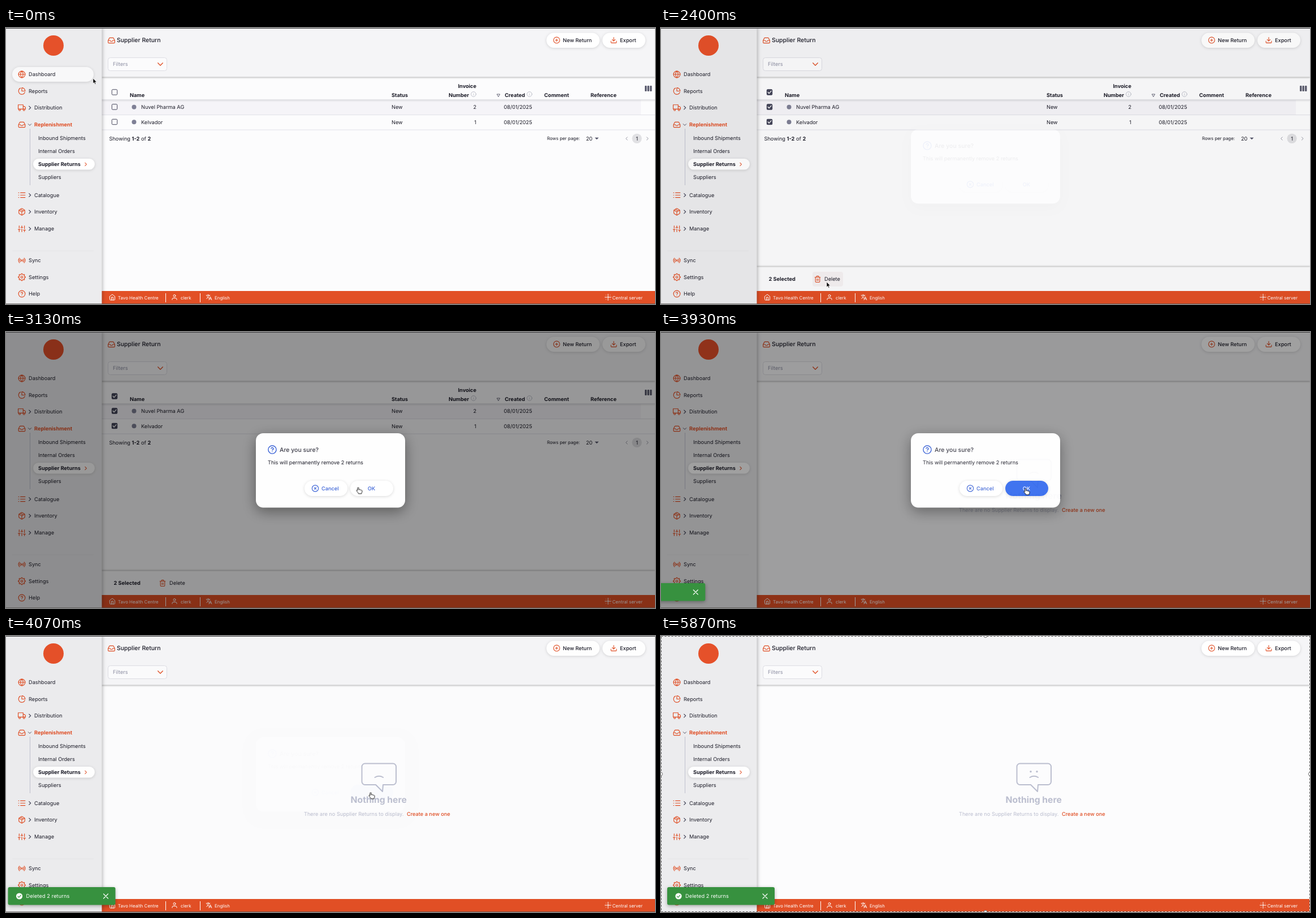
These frames come from a looping animation (1148x488 px, 6 s). An HTML page:

```html
<!DOCTYPE html>
<html lang="en">
<head>
<meta charset="utf-8">
<title>Supplier returns</title>
<style>
  html, body { margin: 0; width: 100%; height: 100%; overflow: hidden; background: #fcfcfd; }
  svg { display: block; width: 100%; height: 100%; }
  text { font-family: Inter, "Liberation Sans", sans-serif; fill: #1c1c28; text-rendering: geometricPrecision; white-space: pre; }
  .b { font-weight: 700; }
  .m { font-weight: 500; }
  .end { text-anchor: end; }
  .mid { text-anchor: middle; }
  .orange { fill: #e04e24; }
  .blue { fill: #3a62d6; }
  .white { fill: #fff; }
  .pale { fill: #bbbecf; }
  .hint { fill: #8d8fa3; }
  .soft { fill: #3c3c48; }
  .line { fill: none; stroke-linecap: round; stroke-linejoin: round; }
  .pill { fill: #fff; filter: drop-shadow(0 1.5px 2.5px rgba(0, 0, 0, .14)); }
  .toast { letter-spacing: .0107em; }
</style>
</head>
<body>
<svg id="stage" viewBox="0 0 1148 488" preserveAspectRatio="none"></svg>
<script>
const LOOP = 6000, FRAME = 200 / 3;
const ORANGE = '#e04e24', BLUE = '#3a62d6', INK = '#45465a', PALE = '#bbbecf';

const ring = '<circle cx="12" cy="12" r="10"/>';
const path = d => `<path d="${d}"/>`;

// Eight-toothed cog on a 24 unit grid
const cog = 'M' + Array.from({ length: 32 }, (_, i) => {
  const r = i % 4 < 2 ? 10.8 : 8.2, a = (i - .5) * Math.PI / 16;
  return (12 + r * Math.cos(a)).toFixed(1) + ' ' + (12 + r * Math.sin(a)).toFixed(1);
}).join('L') + 'z';

const icons = {
  globe: ring + path('M2 12h20M12 2a15.3 15.3 0 0 1 4 10 15.3 15.3 0 0 1-4 10 15.3 15.3 0 0 1-4-10 15.3 15.3 0 0 1 4-10z'),
  pie: path('M21.2 15.9A10 10 0 1 1 8 2.8M22 12A10 10 0 0 0 12 2v10z'),
  truck: path('M1 3h15v13H1zM16 8h4l3 3v5h-7z') + '<circle cx="5.5" cy="18.5" r="2.5"/><circle cx="18.5" cy="18.5" r="2.5"/>',
  inbox: path('M22 12h-6l-2 3h-4l-2-3H2M5.5 5.1L2 12v6a2 2 0 0 0 2 2h16a2 2 0 0 0 2-2v-6l-3.5-6.9A2 2 0 0 0 16.8 4H7.2a2 2 0 0 0-1.7 1.1z'),
  list: path('M8 5h14M8 12h14M8 19h14M2 5h1M2 12h1M2 19h1'),
  box: path('M21 16V8a2 2 0 0 0-1-1.7l-7-4a2 2 0 0 0-2 0l-7 4A2 2 0 0 0 3 8v8a2 2 0 0 0 1 1.7l7 4a2 2 0 0 0 2 0l7-4a2 2 0 0 0 1-1.7zM3.3 7L12 12l8.7-5M12 22V12M7.5 4.2l9 5.2'),
  sliders: path('M4 21v-7M4 10V3M12 21v-9M12 8V3M20 21v-5M20 12V3M1 14h6M9 8h6M17 16h6'),
  radio: '<circle cx="12" cy="12" r="2"/>' + path('M16.2 7.8a6 6 0 0 1 0 8.5M7.8 16.2a6 6 0 0 1 0-8.5M19.1 4.9a10 10 0 0 1 0 14.2M4.9 19.1a10 10 0 0 1 0-14.2'),
  cog: path(cog) + '<circle cx="12" cy="12" r="3"/>',
  help: ring + path('M9.1 9a3 3 0 0 1 5.8 1c0 2-3 3-3 3M12 17h.01'),
  plus: ring + path('M12 8v8M8 12h8'),
  cancel: ring + path('M15 9l-6 6M9 9l6 6'),
  info: ring + path('M12 16v-4M12 8h.01'),
  download: path('M21 15v4a2 2 0 0 1-2 2H5a2 2 0 0 1-2-2v-4M7 10l5 5 5-5M12 15V3'),
  trash: path('M3 6h18M19 6v14a2 2 0 0 1-2 2H7a2 2 0 0 1-2-2V6M8 6V4a2 2 0 0 1 2-2h4a2 2 0 0 1 2 2v2M10 11v6M14 11v6'),
  home: path('M3 9l9-7 9 7v11a2 2 0 0 1-2 2H5a2 2 0 0 1-2-2zM9 22V12h6v10'),
  user: path('M20 21v-2a4 4 0 0 0-4-4H8a4 4 0 0 0-4 4v2') + '<circle cx="12" cy="7" r="4"/>',
  language: path('M2 5h14M9 2v3M13 5c-1 5-5 9-10 12M5 8c2 4 4 6 7 8M12 22l5-12 5 12M14 18h6'),
  hub: '<circle cx="12" cy="12" r="2.5"/>' + path('M12 1v6M12 17v6M1 12h6M17 12h6M4.5 4.5h.01M19.5 4.5h.01M4.5 19.5h.01M19.5 19.5h.01'),
  right: path('M9 5l7 7-7 7'),
  left: path('M15 5l-7 7 7 7'),
  down: path('M4 8l8 8 8-8'),
  close: path('M4 4l16 16M20 4L4 20')
};

const icon = (name, x, y, size = 14, color = ORANGE, weight = 2) =>
  `<g class="line" stroke="${color}" stroke-width="${weight}" transform="translate(${x - size / 2} ${y - size / 2}) scale(${size / 24})">${icons[name]}</g>`;
const text = (x, y, s, cls = '', size = 9.2) =>
  `<text x="${x}" y="${y + size * .36}" class="${cls}" font-size="${size}">${s}</text>`;
const rect = (x, y, w, h, attrs) => `<rect x="${x}" y="${y}" width="${w}" height="${h}" ${attrs}/>`;
const pill = (x, y, w, h) => rect(x, y, w, h, `rx="${h / 2}" class="pill"`);
const group = (id, body, attrs = '') => `<g id="${id}" ${attrs}>${body}</g>`;

const tick = (x, y) => `<path class="line" d="M${x - 2.8} ${y}l2 2.2 3.8-4.4" stroke="#fff" stroke-width="1.3"/>`;
const filled = (x, y) => rect(x - 5, y - 5, 10, 10, `rx="1.5" fill="${INK}"`);
const checkbox = (id, y) =>
  rect(187.3, y - 4.7, 9.4, 9.4, `rx="1.5" fill="none" stroke="${INK}" stroke-width="1"`) +
  group(id, filled(192, y) + tick(192, y));

const navItem = ([name, label, y, arrow]) =>
  icon(name, 28, y) +
  (arrow ? icon(arrow, 42, y, arrow === 'down' ? 8 : 10, INK, 2.8) : '') +
  text(arrow ? 50 : 40, y, label, arrow === 'down' ? 'b orange' : '');

const sidebar =
  rect(0, 0, 169.5, 488, 'fill="#ececee" style="filter:drop-shadow(1px 0 3px rgba(0,0,0,.3))"') +
  '<circle cx="84" cy="31" r="18" fill="#e5512a"/>' +
  group('navHover', rect(11, 69, 144, 26, 'rx="13" class="pill" style="fill:#f8f8f9"')) +
  [['globe', 'Dashboard', 82], ['pie', 'Reports', 111.5],
   ['truck', 'Distribution', 141, 'right'], ['inbox', 'Replenishment', 171, 'down'],
   ['list', 'Catalogue', 295.5, 'right'], ['box', 'Inventory', 325, 'right'],
   ['sliders', 'Manage', 355, 'right'], ['radio', 'Sync', 411],
   ['cog', 'Settings', 440.5], ['help', 'Help', 470]].map(navItem).join('') +
  rect(42, 178, 1, 100, 'fill="#bfc1ce"') + rect(11, 393.5, 144, 1, 'fill="#e3e3e6"') +
  pill(48, 231, 109, 19.5) +
  text(57, 195, 'Inbound Shipments') + text(57, 218, 'Internal Orders') +
  text(57, 241, 'Supplier Returns', 'b') + text(57, 264, 'Suppliers') +
  icon('right', 141, 241, 9, ORANGE, 2.8);

const toolbar =
  rect(169, 0, 979, 86.5, 'fill="#f5f5f7" style="filter:drop-shadow(0 1px 1.5px rgba(0,0,0,.32))"') +
  icon('inbox', 186.5, 22) + text(196, 21.5, 'Supplier Return', 'm', 10.5) +
  pill(956, 8.5, 94, 26.5) + icon('plus', 974, 21.5, 13) + text(985, 22, 'New Return', 'm') +
  pill(1055, 8.5, 76, 26.5) + icon('download', 1075, 21.5, 13) + text(1086, 22, 'Export', 'm') +
  rect(180.5, 52.5, 104, 23, 'rx="4" fill="#fbfbfc" stroke="#dddde3"') +
  text(189, 64, 'Filters', 'hint') + icon('down', 273, 64, 13, ORANGE, 2.4);

const tableRow = (n, y, name, number) =>
  group('hover' + n, rect(169, y - 13, 954, 26.5, 'fill="#e5e9f8"')) +
  rect(169, y + 13.3, 979, 1, 'fill="#e2e2e8"') +
  checkbox('check' + n, y - .3) + `<circle cx="226.5" cy="${y}" r="4" fill="#7f8096"/>` +
  text(239, y, name) + text(682, y, 'New') + text(832, y, number, 'end') + text(880.5, y, '08/01/2025');

const table =
  rect(169, 127, 954, 26.5, 'fill="#f5f4f8"') +
  tableRow(1, 139.8, 'Nuvel Pharma AG', '2') + tableRow(2, 166.3, 'Kelvador', '1') +
  rect(169, 126.5, 979, 1, 'fill="#d9d9df" style="filter:drop-shadow(0 1px 1px rgba(0,0,0,.2))"') +
  checkbox('checkAll', 113.5) +
  group('checkSome', filled(192, 113.5) + rect(189, 112.8, 6, 1.4, 'fill="#fff"')) +
  text(219, 119, 'Name', 'b') + text(682, 119, 'Status', 'b') +
  text(832, 103, 'Invoice', 'b end') + text(819, 119, 'Number', 'b end') +
  icon('info', 827, 117, 10.5, '#a3a5b5', 1.5) +
  '<path d="M868.3 117h5.4l-2.7 4.6z" fill="none" stroke="#55566a" stroke-width=".9"/>' +
  text(918, 119, 'Created', 'b end') + icon('info', 926, 117, 10.5, '#a3a5b5', 1.5) +
  text(952, 119, 'Comment', 'b') + text(1034, 119, 'Reference', 'b') +
  [1130, 1134.5, 1139].map(x => rect(x, 102, 3.4, 10, 'rx="1" fill="#5d5e70"')).join('') +
  text(182.5, 195.5, 'Showing <tspan class="b">1-2</tspan> of <tspan class="b">2</tspan>') +
  text(957, 195.5, 'Rows per page:', '', 7.9) + text(1026, 195.5, '20') +
  '<path d="M1041.5 193.7h7l-3.5 3.6z" fill="#55566a"/>' +
  icon('left', 1098, 195.5, 9, '#8a8b98', 2.4) + icon('right', 1134.5, 195.5, 9, '#8a8b98', 2.4) +
  '<circle cx="1116" cy="195.3" r="8.6" fill="#e1e1e4"/>' + text(1116, 195.5, '1', 'mid');

const actionBar =
  rect(169, 422.5, 979, 42.5, 'fill="#fbfbfc" style="filter:drop-shadow(0 -1px 1.5px rgba(0,0,0,.28))"') +
  group('one', text(190.5, 444, '1 Selected', 'b')) + group('two', text(190.5, 444, '2 Selected', 'b')) +
  group('deleteHover', rect(268, 431, 54, 26, 'rx="4" fill="#f5f1f2"')) +
  group('delete', icon('trash', 276, 444, 13) + text(288, 444, 'Delete'));

const empty =
  `<path class="line" stroke="${PALE}" stroke-width="2" d="M635 225.5h49.500a5.500 5.500 0 0 1 5.500 5.500v26.500a5.500 5.500 0 0 1-5.500 5.500h-17.500l-1 12-12-12h-19a5.500 5.500 0 0 1-5.500-5.500v-26.500a5.500 5.500 0 0 1 5.500-5.500z"/>` +
  `<path class="line" stroke="${PALE}" stroke-width="2" d="M652.500 250q7.300-4.600 14.600 0"/>` +
  group('eyes', '<circle cx="654" cy="239.800" r="1.700"/><circle cx="665" cy="239.800" r="1.700"/>', `fill="${PALE}"`) +
  text(659.2, 289.3, 'Nothing here', 'b pale mid', 15.7) +
  text(527, 315, 'There are no Supplier Returns to display.', 'pale') +
  text(709, 314.7, 'Create a new one', 'm orange');

const footer =
  rect(169, 465, 979, 23, 'fill="#e25026"') +
  icon('home', 188, 476, 12, '#fff') + text(198, 476.8, 'Tavo Health Centre', 'white', 7.92) +
  icon('user', 298, 476, 12, '#fff') + text(309, 476.8, 'clerk', 'white', 7.92) +
  icon('language', 359, 476, 11.5, '#fff') + text(369, 476.8, 'English', 'white', 7.92) +
  icon('hub', 1065, 476, 12, '#fff') + text(1126, 476.8, 'Central server', 'white end', 8) +
  [282, 343].map(x => rect(x, 469, 1, 16, 'fill="#fff"')).join('');

const modal =
  rect(0, 0, 1148, 488, 'fill="#000" fill-opacity=".4"') +
  rect(442, 179, 264, 131.5, 'rx="13" fill="#fefefe" style="filter:drop-shadow(0 7px 12px rgba(0,0,0,.4))"') +
  icon('help', 471, 208, 17, BLUE) + text(484, 208, 'Are you sure?', 'm soft', 10.5) +
  text(463, 230.3, 'This will permanently remove 2 returns') +
  pill(528, 263, 76, 27) + icon('cancel', 547, 276.5, 13.5, BLUE) + text(558, 276.5, 'Cancel', 'm blue') +
  pill(609, 263, 76, 27) + text(646.5, 276.5, 'OK', 'm blue mid') +
  group('okHover', rect(609, 263, 76, 27, 'rx="13.5" fill="#356bee"') + text(646.5, 276.5, 'OK', 'm white mid'));

const toast =
  rect(0, 444, 190, 31.5, 'rx="3" fill="#37913f" style="filter:drop-shadow(0 2px 3px rgba(0,0,0,.3))"') +
  '<circle cx="20" cy="460" r="5.600" fill="#fff"/>' +
  '<path class="line" d="M17.400 460.200l1.900 1.900 3.400-3.800" stroke="#37913f" stroke-width="1.200"/>' +
  text(32, 460, 'Deleted 2 returns', 'white toast') + icon('close', 173, 460, 12, '#fff', 2.4);

const grips = [[574, 0], [574, 488], [0, 244], [1148, 244]]
  .map(([x, y]) => `<circle cx="${x}" cy="${y}" r="2.8" fill="#fff" stroke="#777"/>`).join('');
const capture =
  rect(.5, .5, 1147, 487, 'fill="none" stroke="#e8e8e8"') +
  rect(.5, .5, 1147, 487, 'fill="none" stroke="#555" stroke-dasharray="3 3"') + grips;

const cursor =
  group('arrow', path('M0 0v9.200l2.100-1.900 1.400 3.300 1.500-.6-1.400-3.200h2.800z'), 'stroke="#fff" stroke-width=".7"') +
  group('hand', path('M-1.300 1.200a1.300 1.300 0 0 1 2.600 0v3.200c.6-.8 2.200-.6 2.400.3.7-.6 2-.3 2.200.6 1-.4 1.900.1 1.900 1.200 0 2.300-.6 3.400-1.300 4.600v1h-6v-1c-1.200-1.400-2.400-3-3.600-4.700-.7-1.100.6-2 1.500-1.100l.3.400z'),
    'fill="#fff" stroke="#000" stroke-width="1" stroke-linejoin="round" transform="scale(.9)"') +
  group('beam', path('M-2.500-2q2.500 0 2.500 1.500v7q0 1.500-2.500 1.500M2.500-2q-2.500 0-2.500 1.500'), 'class="line" stroke="#222"');

document.getElementById('stage').innerHTML =
  rect(0, 0, 1148, 488, 'fill="#fcfcfd"') +
  group('table', table) + group('empty', empty) + toolbar + group('bar', actionBar) + footer + sidebar +
  group('modal', modal) + group('toast', toast) +
  group('edge', rect(0, 0, 1148, 1, 'fill="#3c3c3e"') + rect(0, 487, 1148, 1, 'fill="#55504e" fill-opacity=".7"')) +
  group('capture', capture) + group('cursor', cursor);

// Steps are [ms, value, easing to the next step]; without easing the value holds
const tracks = [];
function track(id, prop, steps) {
  const all = [[0, steps[0][1]], ...steps, [LOOP, steps[steps.length - 1][1]]];
  const frames = all.map(([ms, value, easing = 'step-end']) => ({ offset: ms / LOOP, [prop]: value, easing }));
  const anim = document.getElementById(id).animate(frames, { duration: LOOP, iterations: Infinity });
  anim.pause();
  tracks.push(anim);
}
// Shown inside each [from, to] span
const show = (id, ...spans) => track(id, 'opacity',
  [[0, 0], ...spans.flatMap(([from, to]) => [[from, 1], [to, 0]])]);
const at = (x, y) => `translate(${x}px, ${y}px)`;

const STD = 'cubic-bezier(.4, 0, .2, 1)', OUT = 'cubic-bezier(0, 0, .2, 1)';

track('cursor', 'transform', [
  [10, at(154, 89), 'ease-in-out'], [265, at(196, 136)],
  [700, at(196, 136), 'ease-in-out'], [865, at(196, 160)],
  [1330, at(196, 160), 'ease-in-out'], [1930, at(293, 449)],
  [2590, at(293, 449), 'cubic-bezier(.5, 0, .4, 1)'], [3130, at(622, 275), 'ease-out'],
  [3265, at(645, 277)]
]);
show('arrow', [0, 190], [1460, 1860], [2390, 3080], [5990, LOOP]);
show('hand', [190, 1460], [1860, 2390], [3080, 4190]);
show('beam', [4190, 5320]);

track('navHover', 'opacity', [[50, 1, 'linear'], [200, 0]]);
show('hover1', [190, 780]);
show('hover2', [780, 1460]);
show('check1', [590, 3860]);
show('check2', [1130, 3860]);
show('checkSome', [590, 1130]);
show('checkAll', [1130, 3860]);
show('bar', [655, 3860]);
show('one', [655, 1130]);
show('two', [1130, 3860]);
track('delete', 'transform', [[0, at(0, 0)], [1130, at(1, 0)]]);
show('deleteHover', [1860, 2590]);
track('table', 'opacity', [[0, 1], [3860, 0]]);
show('empty', [3860, LOOP]);
show('eyes', [4190, 4590], [4725, 5260], [5325, LOOP]);
track('modal', 'opacity', [[0, 0], [2365, 0, STD], [2590, 1], [3905, 1, STD], [4100, 0]]);
track('okHover', 'opacity', [[0, 0], [3130, 0, STD], [3380, 1]]);
track('toast', 'transform', [[0, at(-205, 0)], [3897, at(-205, 0), OUT], [4122, at(11, 0)]]);
track('edge', 'opacity', [[0, 1], [5460, 0]]);
show('capture', [5460, LOOP]);

const start = performance.now();
function draw() {
  const ms = Math.floor((performance.now() - start + 4) / FRAME) * FRAME % LOOP;
  for (const anim of tracks) anim.currentTime = ms;
  requestAnimationFrame(draw);
}
draw();
</script>
</body>
</html>
```
